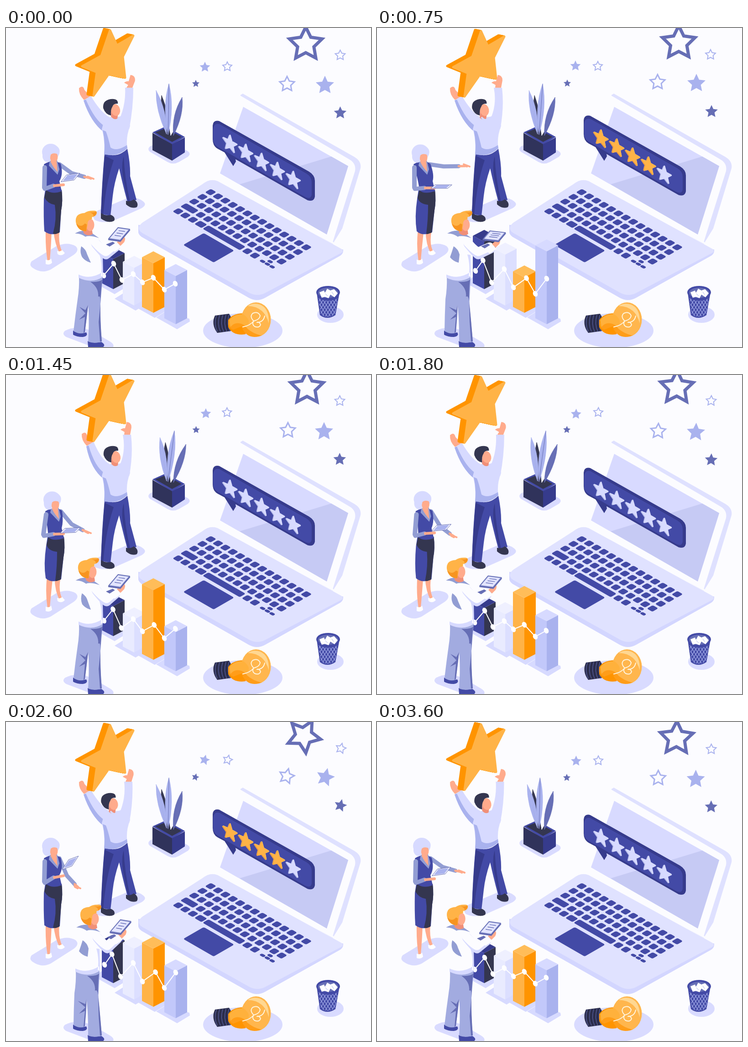
Write an HTML page that moves like this. It is 800 by 700 pixels and loops after 3650 ms.

```html
<!DOCTYPE html>
<html lang="en">
<head>
<meta charset="utf-8">
<style>
html, body { margin: 0; width: 100%; height: 100%; overflow: hidden; background: #fcfcff; }
svg { display: block; width: 800px; height: 700px; }
</style>
</head>
<body>
<svg id="stage" viewBox="0 0 800 700">
  <g id="sky"></g>
  <g fill="#d9dbff">
    <path d="M190 412Q194 402 210 397L262 375Q285 368 300 380Q311 388 296 396L240 421Q214 431 194 421Z"/>
    <path d="M56 512L110 479Q135 468 153 479Q162 488 148 498L98 530Q78 540 58 526Q50 520 56 512Z"/>
    <path d="M130 664Q160 650 192 667L228 688Q238 694 235 700H190L132 678Q121 671 130 664Z"/>
    <path d="M317 259L352 245L398 270Q407 276 398 283L379 294Q366 301 354 294L316 272Q308 265 317 259Z"/>
    <ellipse cx="519" cy="664" rx="87" ry="38"/>
    <ellipse cx="711" cy="629" rx="29" ry="18"/>
  </g>
  <g id="hero"></g>
  <g id="plant"></g>
  <g id="laptop"></g>
  <g id="bubble"></g>
  <g id="woman"></g>
  <g id="chart"></g>
  <g id="man"></g>
  <g id="bulb"></g>
  <g id="bin"></g>
</svg>
<script>
const LOOP = 3650, STEP = 50, TAU = Math.PI * 2;
const NAVY = '#434aa6', DEEP = '#363b8c', INK = '#343650', MID = '#666eb5', BLUE = '#a9b2ee',
      PALE = '#d7daff', MIST = '#e3e5ff', PAPER = '#fcfcff', SKIN = '#ffab8c', GOLD = '#ffb347',
      ORANGE = '#ff9400', SHIRT = '#929dd3', DENIM = '#a2abe0';

const $ = id => document.getElementById(id);
const fill = (d, color, extra = '') => `<path d="${d}" fill="${color}" ${extra}/>`;
const line = (d, color, w) =>
  `<path d="${d}" fill="none" stroke="${color}" stroke-width="${w}" stroke-linecap="round" stroke-linejoin="round"/>`;
const oval = (x, y, rx, ry, color, extra = '') =>
  `<ellipse cx="${x}" cy="${y}" rx="${rx}" ry="${ry}" fill="${color}" ${extra}/>`;
const rim = (color, w) => `stroke="${color}" stroke-width="${w}" stroke-linejoin="round"`;
const group = (transform, body) => `<g transform="${transform}">${body}</g>`;
const poly = pts => 'M' + pts.map(p => p.join(' ')).join('L') + 'Z';
const clamp = v => Math.max(0, Math.min(1, v));
const mix = (a, b, k) => a + (b - a) * k;

// Periodic eased track through [phase, value] pairs
function track(p, keys) {
  const i = keys.findLastIndex(k => k[0] <= p);
  const [p0, a] = keys[i], [p1, b] = keys[i + 1] || [1, keys[0][1]];
  const k = (p - p0) / (p1 - p0);
  return mix(a, b, k * k * (3 - 2 * k));
}
const BEATS = [0, 750, 1450, 2150, 2600, 3200];
const beat = (t, ...values) => track(t / LOOP, BEATS.map((b, i) => [b / LOOP, values[i]]));

function starShape(R, r = R * .45) {
  return poly(Array.from({ length: 10 }, (_, i) => {
    const a = i * TAU / 10 - TAU / 4, q = i % 2 ? r : R;
    return [(q * Math.cos(a)).toFixed(2), (q * Math.sin(a)).toFixed(2)];
  }));
}

function drawSky(t) {
  const a = t / LOOP * TAU, dx = Math.sin(a), dy = Math.cos(a) - .75;
  const bx = 2 * Math.sin(2 * a), by = 2.3 * Math.cos(2 * a);
  const tilt = beat(t, 0, 0, 0, 5, 14, 12);
  const outline = (x, y, R, w, color, turn) => group(`translate(${x} ${y}) rotate(${turn})`,
    `<path d="${starShape(R, R * .5)}" fill="${PAPER}" stroke="${color}" stroke-width="${w}"/>`);
  const solid = (x, y, R, color) =>
    group(`translate(${x} ${y}) rotate(${tilt})`, fill(starShape(R, R * .48), color));
  return outline(657 + 4.5 * dx, 34.5 + 4 * dy, 37.5, 7, MID, beat(t, 0, 0, 0, 2, 29, 36)) +
    outline(732.5 - 1.5 * dx, 59.5 + 1.6 * dy, 11.5, 2, BLUE, tilt) +
    outline(485 - dx, 84.5 + 1.4 * dy, 10.5, 2, BLUE, tilt) +
    outline(616 - bx, 121 + by, 17, 3, BLUE, tilt) +
    solid(416 + dx, 122 + dy, 8.5, MID) +
    solid(436 - bx, 84.5 + by * .6, 12, BLUE) +
    solid(699 + bx, 123.5 + by, 21, BLUE) +
    solid(732.5 + bx * .6, 184.8 + by * .7, 14.5, MID);
}

const BIG_STAR = 'M228 5L243 38L279 17L256 63L261 109L225 101L192 148L199 97L167 84L209 61Z';

function drawHero(t) {
  const p = t * 4 / LOOP % 1, q = t * 2 / LOOP % 1;
  const dy = track(p, [[0, 0], [.356, -3], [.507, -4], [.589, -3.5], [.835, 2]]);
  const lx = track(p, [[0, 178], [.356, 180], [.507, 186], [.589, 184], [.822, 178]]);
  const rx = track(p, [[0, 270], [.356, 252], [.507, 262], [.589, 265], [.822, 265], [.849, 268]]);
  const ly = 154 - (lx - 178) * .4, ry = 131, h = (rx - 267) * .6;
  const head = -2.8 + 3 * Math.cos(TAU * (q - .86));
  let edge = '';
  for (let i = 13; i > 0; i--)
    edge += group(`translate(${-i} ${-i * .2})`, fill(BIG_STAR, ORANGE, rim(ORANGE, 5)));
  return fill(`M${lx - 7} ${ly + 4}Q${lx - 19} ${ly - 8} ${lx - 18} ${ly - 22}Q${lx - 9} ${ly - 30} ${lx - 6} ${ly - 18}L${lx + 7} ${ly - 4}Z`, SKIN) +
    fill(`M${lx - 8} ${ly + 5}Q186 207 214 228L232 198Q210 190 ${lx + 8} ${ly - 5}Z`, PALE) +
    fill(`M${lx - 8} ${ly + 5}Q186 207 214 228L217 216Q195 203 ${lx - 3} ${ly + 3}Z`, BLUE) +
    group(`translate(0 ${dy})`, edge + fill(BIG_STAR, GOLD, rim(GOLD, 5))) +
    fill(`M${rx - 6} ${ry}L${rx - 4 + h} ${ry - 6}L${rx - 13 + h} ${ry - 11}Q${rx - 7 + h} ${ry - 15} ${rx - 3 + h} ${ry - 14}L${rx + 1 + h} ${ry - 28}Q${rx + 12 + h} ${ry - 27} ${rx + 11 + h} ${ry - 15}L${rx + 7} ${ry}Z`, SKIN) +
    fill(`M${rx - 9} ${ry}Q263 165 250 197L270 222Q279 175 ${rx + 9} ${ry}Z`, PALE) +
    fill('M216 276Q245 286 266 265Q273 300 272 325L286 377L267 385Q256 345 248 308Q237 340 234 368L229 412L208 408Q210 340 216 276Z', NAVY) +
    fill('M258 282Q252 300 257 330L268 384L272 382Q260 330 258 282ZM236 290Q219 340 213 409L208 408Q211 340 216 280Z', DEEP) +
    fill('M208 406Q218 413 230 410Q241 415 237 423Q224 430 208 418ZM263 379Q272 382 280 376Q292 383 287 393Q275 398 263 387Z', INK) +
    fill('M214 207Q222 195 232 197L252 194Q268 196 272 215Q262 240 266 264Q245 284 215 277Q217 245 210 222Z', PALE) +
    fill('M212 224Q218 250 215 277Q245 284 266 264L265 257Q242 272 229 262Q224 240 219 227Z', BLUE) +
    group(`translate(${head} 0)`,
      fill('M231 182L247 184L245 199Q238 204 231 197Z', '#f08f78') +
      oval(241, 180, 10, 13, SKIN, 'transform="rotate(-12 241 180)"') +
      fill('M214 176Q212 159 230 156Q247 154 246 166Q236 165 234 173Q230 178 231 192Q219 190 214 176Z', INK)) +
    line('M230 197Q240 208 252 195', PALE, 4);
}

function drawPlant(t) {
  const sway = beat(t, 0, 6, 12, 14, 0, 10);
  const leaf = (bx, by, tx, ty, w, left, right = left) => {
    const x = mix(bx, tx, .5), y = mix(by, ty, .5);
    const half = (k, color) => fill(`M${bx} ${by}Q${x + k * w} ${y - 4} ${tx} ${ty}Z`, color, rim(color, .6));
    return half(-1, left) + half(1, right);
  };
  return fill('M321 229L350 216L392 239L364 256Z', NAVY) + fill('M327 229L350 220L385 239L364 250Z', INK) +
    leaf(353, 236, 341 + sway * .7, 148, 12, INK) +
    leaf(352, 233, 329 + sway * .7, 137, 13, BLUE) +
    leaf(361, 236, 378 + sway * .5, 162, 18, PAPER) +
    leaf(355, 234, 357 + sway, 122, 14, BLUE) +
    line(`M355 234Q${357 + sway * .4} 180 ${357 + sway} 124`, MID, 1) +
    leaf(367, 236, 386 + sway * .7, 152, 14, MID) +
    fill('M321 230L364 255V291L321 268Z', '#30335b') + fill('M364 255L392 240V273L364 291Z', DEEP);
}

function drawLaptop() {
  const key = (x, y, w = 14, h = 15) => `<rect x="${x}" y="${y}" width="${w}" height="${h}" rx="3.5"/>`;
  let keys = key(81, 99, 77, 52) + key(70, 76, 94);
  for (let row = 0; row < 4; row++)
    for (let i = 0; i < 14; i++)
      keys += row == 3 && i < 2 ? (i ? '' : key(-7, 55.5, 32)) : key(-7 + i * 18.6, -7 + row * 20.8);
  for (const x of [-6, 12, 31, 49, 169, 188]) keys += key(x, 76, x == 49 ? 18 : 14);
  for (const [x, y] of [[212, 83], [222, 74], [224, 83], [236, 83]]) keys += key(x, y, 11, 7);
  return fill('M514 147L519 144L762 282Q780 292 777 308L737 440L716 474L469 330Z', '#dfe1ff') +
    fill('M513 148L752 288Q768 297 765 314L716 470L462 328Z', PAPER) +
    fill('M520 173L750 303L703 453L469 319Z', '#d8daff') +
    fill('M713 282L750 303L703 453L512 343Z', '#c6caf4') +
    fill('M290 432V449Q292 456 300 460L532 592Q550 602 568 592L732 500Q740 495 739 486Z', '#d3d6ff') +
    fill('M464 336L734 484Q742 489 734 494L567 582Q550 590 533 581L299 450Q283 440 299 427L430 343Q447 329 464 336Z', '#e0e2ff') +
    line('M470 334L716 471', PAPER, 4) +
    `<g transform="matrix(.866 .5 -.866 .5 449 360)" fill="${NAVY}">${keys}</g>`;
}

function drawBubble(t) {
  const p = t * 2 / LOOP % 1, fade = 1 - clamp((p - .71) / .08);
  const face = starShape(18, 7.8);
  const star = (front, side) => group('translate(-2 1.5)', fill(face, side, rim(side, 3))) + fill(face, front, rim(front, 3));
  const body = 'M453 214Q454 201 467 204L664 315Q677 323 677 335V370Q675 382 661 378L503 288L504 293L498 303L479 273L464 265Q453 259 453 244Z';
  let stars = '';
  for (let k = 0; k < 5; k++) {
    const lit = clamp((p - .04 - k * .1) / .035) * fade;
    stars += group(`matrix(.86 .43 0 1 ${491.5 + k * 34.7} ${253.5 + k * 19.8})`,
      star(PALE, '#b2b7e6') + `<g opacity="${lit}">${star(GOLD, '#e8943f')}</g>`);
  }
  return group(`translate(0 ${-6.2 + 6.2 * Math.cos(p * TAU)})`,
    fill(body, DEEP) + fill('M454 222Q456 207 468 211L658 319Q670 326 670 338V366Q668 377 656 371L464 261Q454 255 454 243Z', NAVY) + stars);
}

function drawWoman(t) {
  const lean = beat(t, 0, 1, 1, 0, 0, 0), w = 5 * lean;
  const hx = beat(t, 192, 203, 186, 163, 163, 196), hy = beat(t, 330, 303, 346, 364, 364, 318);
  const head = beat(t, 0, -3, 3, 0, 0, 0), cy = beat(t, 328, 348, 341, 329, 309, 328);
  const sx = 117 + head, ex = mix(sx, hx, .36), ey = mix(298, hy, .55) + 3;
  const wx = mix(ex, hx, .58), wy = mix(ey, hy, .7);
  const d = cy - 328, ux = 14.5 + d * .2, uy = -2 + d * .1, vx = -6 + d * .06, vy = 7.5 - d * .18;
  const slab = k => poly([[1, 1], [1, -1], [-1, -1], [-1, 1]].map(([a, b]) =>
    [141 + k * (a * ux + b * vx), cy + k * (a * uy + b * vy)]));
  const elbow = 79 - 2 * lean;
  return fill(`M${87 + w * .5} 445H${100 + w * .5}Q99 475 96 510L91 512Q86 480 ${87 + w * .5} 445ZM${104 + w * .5} 445H${117 + w * .5}Q114 475 124 492L118 495Q107 475 ${104 + w * .5} 445Z`, SKIN) +
    fill('M87 508Q94 512 99 506L101 515Q96 521 87 518ZM112 489Q119 492 123 487L129 494Q121 502 113 496Z', '#fff') +
    fill(`M${86 + w} 355H${122 + w}Q${125 + w} 380 ${121 + w} 400L${118 + w * .6} 448Q100 458 ${84 + w * .6} 446Q82 415 ${83 + w} 375Z`, NAVY) +
    fill(`M${88 + w} 355H${122 + w}Q${125 + w} 380 ${121 + w} 400L${117 + w * .6} 449Q108 454 ${103 + w} 451Q112 420 ${107 + w} 388Q92 386 ${84 + w} 372Z`, INK) +
    line(`M${sx} 299L${ex} ${ey}L${wx} ${wy}`, SHIRT, 9) +
    line(`M${wx} ${wy}L${mix(wx, hx, .6)} ${mix(wy, hy, .8)}`, SKIN, 5) +
    line(`M${hx - 13} ${hy - 4}L${hx} ${hy + 1}M${hx - 12} ${hy - 2}L${hx - 6} ${hy + 1}`, SKIN, 4) +
    fill(`M${83 + head} 299Q${95 + head} 291 ${110 + head} 292L${120 + head} 298Q126 322 ${117 + w} 336L${122 + w} 358Q103 366 ${88 + w} 356Q91 335 ${83 + head} 299Z`, NAVY) +
    fill(`M${96 + head} 291L${112 + head} 290L${117 + head} 310L${113 + head} 322L${94 + head} 302Z`, SHIRT) +
    fill(`M${98 + head} 284H${110 + head}L${113 + head} 316Q${103 + head} 305 ${98 + head} 294Z`, SKIN) +
    line(`M${85 + head} 306L${elbow + 5} 350`, SHIRT, 10) +
    line(`M${elbow + 6} 353L104 ${346 + d * .25}`, SHIRT, 9) +
    line(`M106 ${346 + d * .25}L126 ${344 + d * .35}`, SKIN, 6) +
    fill(slab(1), PAPER, rim(MID, 1)) + fill(slab(.8), BLUE) +
    group(`translate(${head} ${lean * 1.5})`,
      oval(98, 272, 19, 18, PALE) + oval(91, 281, 11, 13, PALE) + oval(105, 283, 8.5, 12, SKIN) +
      fill('M84 268Q88 254 106 257Q122 263 116 278Q104 272 98 278L95 292Q84 290 81 279Z', PALE));
}

function drawChart(t) {
  const bar = (x, base, top, left, right, cap) =>
    fill(`M${x - 43} ${base - 15}L${x - 22} ${base - 28}L${x + 30} ${base - 12}L${x + 31} ${base - 6}L${x + 3} ${base + 11}Z`, PALE) +
    fill(`M${x - 25} ${top + 13}L${x} ${top + 26}V${base}L${x - 25} ${base - 13}Z`, left) +
    fill(`M${x} ${top + 26}L${x + 25} ${top + 13}V${base - 13}L${x} ${base}Z`, right) +
    fill(`M${x} ${top}L${x + 25} ${top + 13}L${x} ${top + 26}L${x - 25} ${top + 13}Z`, cap);
  const k = (1 - Math.cos(t * 2 / LOOP * TAU)) / 2;
  const dots = [[214, 543, 2, -11], [236, 517, -4, -8], [254, 553, -3, 6], [279, 540, 0, -12],
    [299, 558, 0, 12], [323, 548, 5, 1], [347, 574, 0, 10], [371, 561, 1, -12]]
    .map(([x, y, dx, dy]) => [x + dx * k, y + dy * k]);
  return bar(235, 573, beat(t, 481, 443, 481, 489, 466, 479), NAVY, INK, DEEP) +
    bar(281, 609, beat(t, 500, 471, 510, 487, 471, 484), '#e9ebff', '#dcdfff', '#eff0ff') +
    bar(323, 625, beat(t, 490, 521, 446, 480, 471, 463), GOLD, ORANGE, '#ffbd59') +
    bar(372, 650, beat(t, 518, 464, 538, 490, 521, 531), '#c2c8fa', BLUE, PALE) +
    line('M' + dots.map(d => d.join(' ')).join('L'), '#fff', 2) +
    dots.map(([x, y]) => oval(x, y, 5, 6.5, '#fff', `transform="rotate(-25 ${x} ${y})"`)).join('');
}

function drawMan(t) {
  const q = t * 2 / LOOP % 1;
  const w = track(q, [[0, 0], [.178, 3], [.418, -7], [.753, -2], [.795, 0]]);
  const hx = track(q, [[0, 0], [.178, -11], [.418, 10], [.753, 7], [.795, 5]]), s = hx * .3;
  const px = beat(t, 248, 257, 248, 250, 251, 248), py = beat(t, 452, 456, 452, 455, 449, 452);
  const flat = beat(t, 0, 1, 0, .9, -.3, 0);
  const ux = 13.5 + 4.5 * flat, vx = 11 - 3 * flat, vy = -13 + 3.5 * flat;
  const at = (a, b) => [px + a * ux + b * vx, py + a * 2 + b * vy];
  const slab = k => poly([at(-k, -k), at(-k, k), at(k, k), at(k, -k)]);
  const text = [.5, .1, -.3].map(b => line('M' + at(-.45, b).join(' ') + 'L' + at(.5, b).join(' '), MID, 1.4)).join('');
  return fill('M147 664Q160 671 176 668Q181 676 168 678Q155 678 147 673ZM179 687Q196 692 209 689Q219 695 213 700H180Z', NAVY) +
    fill(`M${160 + w} 546L${212 + w} 546Q${209 + w * .7} 580 ${207 + w * .7} 605Q206 640 210 688Q194 694 180 688Q${183 + w * .4} 640 ${180 + w * .5} 608Q177 640 172 669Q160 673 148 665Q${152 + w * .5} 630 ${157 + w} 595Q${161 + w} 570 ${160 + w} 546Z`, DENIM) +
    fill(`M${185 + w} 557Q${206 + w} 558 ${211 + w} 552Q${208 + w} 575 ${207 + w * .7} 605L203 645L206 688L210 688Q206 640 ${207 + w * .7} 600Q${207 + w} 585 ${202 + w} 590Q${204 + w} 570 ${185 + w} 557ZM${161 + w * .5} 612L174 626L160 640L173 634L170 669L173 667L${180 + w * .5} 608L174 619Z`, MID) +
    fill(`M${157 + s} 452Q${175 + s} 443 ${199 + s} 456Q${214 + s} 470 ${212 + w} 505L${212 + w} 546Q${188 + w} 562 ${159 + w} 545Q${158 + w} 525 ${168 + w} 508Q${158 + s} 488 ${157 + s} 452Z`, PAPER) +
    fill(`M${159 + w} 541Q${185 + w} 553 ${211 + w} 536L${212 + w} 546Q${188 + w} 562 ${159 + w} 548ZM${205 + w} 497Q${212 + w} 520 ${208 + w} 545L${213 + w} 543L${212 + w} 498Z`, PALE) +
    fill(`M${165 + s} 479Q${175 + s} 485 ${178 + s} 497L${186 + w} 515Q${174 + w} 512 ${167 + w} 503Q${161 + s} 492 ${165 + s} 479Z`, SHIRT) +
    line(`M${197 + s} 473Q${213 + s} 493 ${219 + s} 497L${px - 8} ${py + 28}`, PALE, 21) +
    line(`M${195 + s} 470Q${211 + s} 488 ${219 + s} 491L${px - 10} ${py + 24}`, PAPER, 19) +
    fill(`M${px - 29} ${py + 23}L${px - 14} ${py + 17}L${px - 5} ${py + 23}L${px - 15} ${py + 31}Z`, MID) +
    fill(`M${px - 23} ${py + 29}L${px - 6} ${py + 18}L${px + 5} ${py + 29}L${px - 10} ${py + 39}Z`, PAPER) +
    fill(`M${px - 5} ${py + 18}L${px + 9} ${py + 6}Q${px + 16} ${py + 8} ${px + 11} ${py + 18}L${px + 3} ${py + 26}Z`, SKIN) +
    group('translate(0 2)', fill(slab(.95), MID, rim(MID, 2))) +
    fill(slab(.95), SHIRT, rim(MID, 1.5)) + fill(slab(.83), MIST) + text +
    fill(`M${151 + s} 451Q${167 + s} 441 ${184 + s} 447L${204 + s} 461Q${183 + s} 454 ${174 + s} 458Q${163 + s} 450 ${151 + s} 451Z`, SHIRT) +
    group(`translate(${hx} 0)`,
      fill('M168 437L188 440L190 452Q180 459 170 450Z', '#f08f78') + oval(184.5, 432, 9, 13.5, SKIN) +
      fill('M153 426Q151 407 172 406Q180 400 196 401Q201 405 197 411Q191 415 188 415Q191 420 183 421Q178 424 179 431L176 446Q157 446 153 426Z', GOLD) +
      fill('M182 404Q194 406 198 402Q201 407 192 414Q193 407 182 404ZM154 429Q164 439 173 429L177 431L176 446Q159 446 154 429Z', '#f79420'));
}

function drawBulb(t) {
  const p = t * 2 / LOOP % 1, off = clamp(1 - Math.abs(p - .178) / .07);
  const neck = 'M487 641Q496 626 521 626Q534 645 525 672Q497 676 487 656Z';
  const thread = [0, 1, 2, 3, 4].map(i => line(`M${461 + i * 7} ${631 - i * .5}Q${455 + i * 7} 650 ${463 + i * 7} 666`, MID, 1)).join('');
  return fill('M458 631L489 627Q501 646 492 665L463 669Q449 650 458 631Z', '#2b2d4c') + thread +
    fill(neck, ORANGE) + oval(548, 640, 32.5, 38, '#ffb64d') +
    fill('M516 633Q520 665 560 675Q528 686 516 655L498 662Q487 658 488 647Z', '#ff9d19') +
    fill('M489 641Q500 627 520 628Q540 642 527 655Q505 640 492 656Z', '#ffb13c') +
    fill('M530 610Q542 602 557 607Q577 615 576 648Q571 630 561 621Q548 610 530 610Z', '#ffd791') +
    `<g opacity="${off}">${fill(neck, '#ffc568') + oval(548, 640, 32.5, 38, '#ffd895')}</g>` +
    line('M519 656Q535 653 543 643Q533 633 541 626Q552 621 557 631Q556 640 543 643Q538 650 545 655Q555 659 558 651Q556 645 550 646Q564 646 567 632', '#fff5df', 2);
}

function drawBin() {
  let mesh = '';
  for (let x = 664; x < 732; x += 7) mesh += `M${x} 592L${x + 27} 634M${x + 27} 592L${x} 634`;
  return '<clipPath id="basket"><path d="M685 593Q706 604 728 593L721 628Q704 639 690 628Z"/></clipPath>' +
    fill('M681 581L688 630Q704 642 722 630L731 581Z', NAVY) +
    `<g clip-path="url(#basket)">${line(mesh, BLUE, 1.1)}</g>` +
    oval(706, 580, 26, 14, NAVY) + oval(706, 581, 22, 11, MID) +
    fill('M687 580L697 576L699 581L704 572L711 576L719 573L727 582L720 591L711 585L707 593L699 590L692 592Z', '#fff') +
    line('M700 583L705 588M714 579L718 585', BLUE, 1);
}

$('laptop').innerHTML = drawLaptop();
$('bin').innerHTML = drawBin();
const moving = { sky: drawSky, hero: drawHero, plant: drawPlant, bubble: drawBubble,
  woman: drawWoman, chart: drawChart, man: drawMan, bulb: drawBulb };
let shown = -1;

function render() {
  const t = Math.floor(performance.now() % LOOP / STEP) * STEP;
  if (t !== shown) for (const id in moving) $(id).innerHTML = moving[id](t);
  shown = t;
  requestAnimationFrame(render);
}
render();
</script>
</body>
</html>
```
